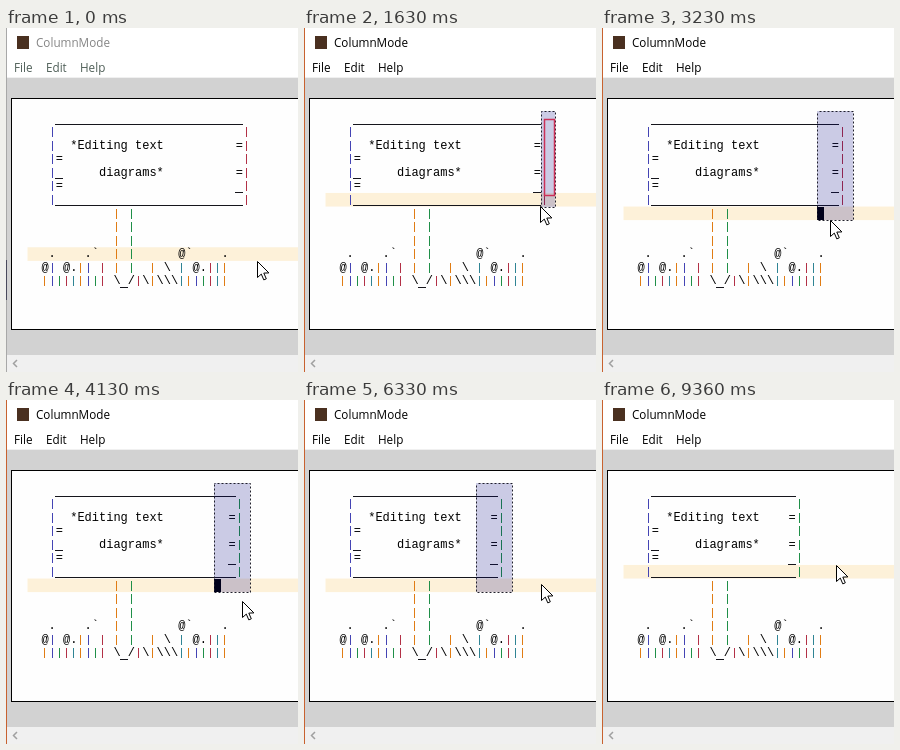
These frames come from a looping animation (292 px wide and 344 px high, 9630 ms). An HTML page with a canvas:

```html
<!DOCTYPE html>
<html lang="en">
<head>
<meta charset="utf-8">
<title>ColumnMode</title>
<style>
  html, body { margin: 0; width: 292px; height: 344px; overflow: hidden; background: #fff; }
  canvas { display: block; }
</style>
</head>
<body>
<canvas id="stage" width="292" height="344"></canvas>
<script>
const ctx = document.getElementById('stage').getContext('2d');
const LOOP = 9630, BLINK = 430, LAST_BLINK = 9360;
const X0 = 21, Y0 = 83.4, CW = 7.2, RH = 13.59;
const PRESS = 1300, RELEASE = 2900, CLICK = 6930, DRAG_LAG = 80;
const UI_FONT = '11.7px "Open Sans", "Noto Sans", sans-serif';
const CODE_FONT = '12px "Liberation Mono", "Courier New", monospace';

// Thin bars take a subpixel tint that repeats every five columns.
const TINTS = ['#b23046', '#2f8494', '#e07c14', '#4444b4', '#1f8f48'];

// Times of each one-column move to the left.
const SHIFTS = [3760, 4240, 4500, 4770, 5120, 5480];

// Pointer path: time, x, y.
const PATH = [
  [130, 251, 233], [760, 251, 98], [1210, 251, 98], [PRESS, 250, 91],
  [1550, 240, 167], [1630, 236, 178], [1860, 233, 183], [2320, 221, 181],
  [2960, 219, 183], [3500, 236, 201], [5900, 236, 201], [6330, 237, 184],
  [6830, 237, 176], [CLICK, 236, 174], [7030, 234, 165]
];

const colX = c => Math.round(X0 + c * CW);
const rowTop = r => Y0 + r * RH;
const rowY = r => Math.round(rowTop(r));
const colAt = x => Math.floor((x - X0) / CW);
const rowAt = y => Math.floor((y - Y0) / RH);

function box(color, x, y, w, h) {
  ctx.fillStyle = color;
  ctx.fillRect(x, y, w, h);
}

function label(text, x, y, color) {
  ctx.font = UI_FONT;
  ctx.fillStyle = color;
  ctx.fillText(text, x, y);
}

function pointer(t) {
  const i = PATH.findIndex(p => p[0] > t);
  if (i === 0) return PATH[0].slice(1);
  if (i < 0) return PATH[PATH.length - 1].slice(1);
  const [t0, x0, y0] = PATH[i - 1], [t1, x1, y1] = PATH[i];
  let k = (t - t0) / (t1 - t0);
  k = k * k * (3 - 2 * k);
  return [x0 + (x1 - x0) * k, y0 + (y1 - y0) * k];
}

function textRows(shift) {
  const edge = 30 - shift;
  const line = '_'.repeat(edge - 4);
  const side = (left, tail) => ('   |' + left).padEnd(edge - 1) + tail + '|';
  const stem = '            | |';
  return [
    '    ' + line,
    side('', ' '),
    side('  *Editing text', '='),
    side('=', ' '),
    side('_     diagrams*', '='),
    side('=', '_'),
    '   |' + line + '|',
    stem, stem, stem,
    '   .    .`  | |      @`    .',
    '  @| @.|| | | |  | \\ | @.|||',
    '  ||||||||| \\_/|\\|\\\\\\|||||||'
  ];
}

function drawText(rows) {
  ctx.font = CODE_FONT;
  rows.forEach((row, r) => {
    const y = rowY(r);
    [...row].forEach((ch, c) => {
      const x = X0 + c * CW;
      if (ch === '|') {
        box(TINTS[c % 5], Math.floor(x + CW / 2 - 0.1), y + 2, 1, 10);
      } else if (ch === '_') {
        box('#15151c', Math.floor(x), Math.floor(rowTop(r) + 13), 8, 1);
      } else if (ch !== ' ') {
        ctx.fillStyle = '#000';
        ctx.fillText(ch, x, y + 10);
      }
    });
  });
}

function drawWindow(active) {
  box('#fff', 0, 0, 292, 344);
  box('#f0f0f0', 0, 49, 292, 1);
  box('#d2d2d2', 0, 50, 292, 277);
  box('#f0f0f0', 0, 327, 292, 17);
  box('#000', 5, 70, 287, 232);
  box('#fefefe', 6, 71, 286, 230);
  box(active ? '#c8622f' : '#a8a8a8', 0, 0, 1, 344);
  if (!active) box('#4a4a5c', 0, 232, 1, 40);
  box('#4a3020', 11, 8, 12, 13);
  label('ColumnMode', 30, 19, active ? '#000' : '#858585');
  const menu = active ? '#000' : '#4f5f58';
  label('File', 8, 44, menu);
  label('Edit', 40, 44, menu);
  label('Help', 74, 44, menu);
  ctx.strokeStyle = '#a0a0a0';
  ctx.lineWidth = 1.5;
  ctx.beginPath();
  ctx.moveTo(11, 332);
  ctx.lineTo(7.5, 335.5);
  ctx.lineTo(11, 339);
  ctx.stroke();
}

function drawSelection(c0, c1, r1, t) {
  const x = colX(c0), y = rowY(0);
  const w = colX(c1 + 1) - x, h = rowY(r1 + 1) - y;
  box('rgba(0, 0, 128, 0.2)', x, y, w, h);
  ctx.strokeStyle = '#20202c';
  ctx.lineWidth = 1;
  ctx.setLineDash([2, 2]);
  ctx.lineDashOffset = -Math.floor(t / 70) % 4;
  ctx.strokeRect(x + 0.5, y + 0.5, w, h);
  ctx.setLineDash([]);
}

function drawDragBox(x0, y0, x1, y1) {
  const [left, top, right, bottom] = [x1, y0, x0, y1].map(v => Math.round(v) + 0.5);
  ctx.strokeStyle = '#cc3058';
  ctx.lineWidth = 1.5;
  ctx.strokeRect(left, top, right - left, bottom - top);
}

function drawPointer([x, y]) {
  const pts = [[0, 0], [0, 16], [3.8, 12.6], [6.3, 18.4], [8.8, 17.3], [6.3, 11.6], [11.4, 11.4]];
  ctx.beginPath();
  pts.forEach(([px, py]) => ctx.lineTo(Math.round(x) + px + 0.5, Math.round(y) + py + 0.5));
  ctx.closePath();
  ctx.fillStyle = '#fff';
  ctx.fill();
  ctx.strokeStyle = '#000';
  ctx.lineWidth = 1;
  ctx.stroke();
}

function render(t) {
  const dragging = t >= PRESS && t < RELEASE;
  const selected = t >= PRESS && t < CLICK;
  const shift = SHIFTS.filter(s => t >= s).length;
  const start = pointer(PRESS);
  const drag = pointer(Math.max(PRESS, t - DRAG_LAG));

  let caret = [29, 10];
  if (dragging) caret = [colAt(drag[0]), rowAt(drag[1])];
  else if (selected) caret = [27 - shift, 7];
  else if (t >= CLICK) caret = [29, 6];
  const [col, row] = caret;

  drawWindow(t >= PRESS);
  box('#fdf1d9', X0 + 0.5, rowTop(row), 271, RH);
  drawText(textRows(shift));

  const blinkOn = Math.abs(Math.floor((t - LAST_BLINK) / BLINK)) % 2 === 1;
  if (blinkOn && !dragging) box('#000', colX(col), rowY(row), 7, rowY(row + 1) - rowY(row));

  if (selected) drawSelection(col, 31 - shift, row, t);
  if (dragging) drawDragBox(...start, ...drag);
  drawPointer(pointer(t));
}

const begin = performance.now();
function tick() {
  render((performance.now() - begin) % LOOP);
  requestAnimationFrame(tick);
}
tick();
</script>
</body>
</html>
```
